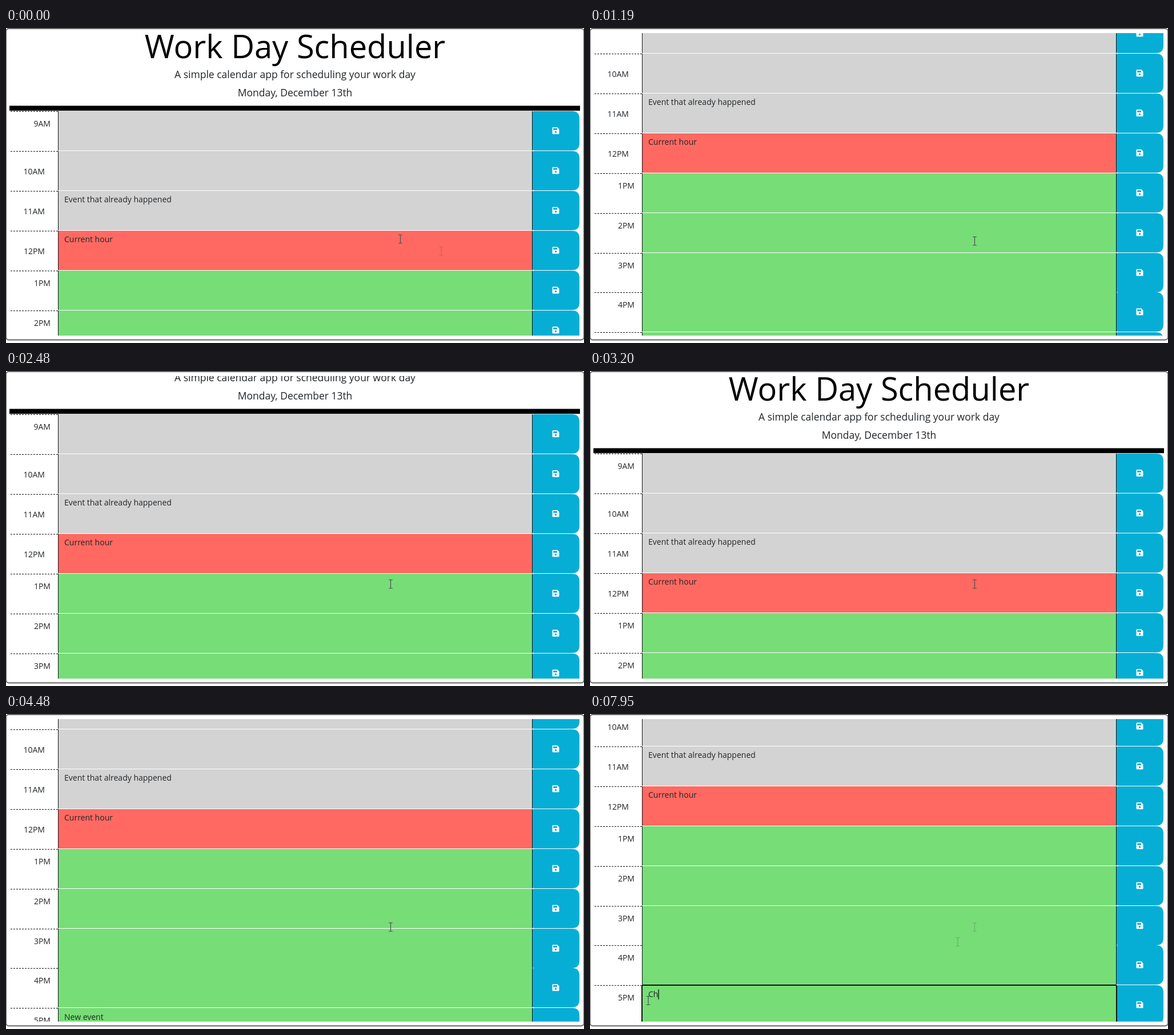
An HTML page for the animation above (8 s loop, 1012 px wide and 553 px high).

```html
<!DOCTYPE html>
<html lang="en">
<head>
<meta charset="utf-8">
<title>Work Day Scheduler</title>
<style>
  html, body { margin: 0; width: 100%; height: 100%; overflow: hidden; background: #fff; }
  svg { display: block; width: 1012px; height: 553px; font: 14px "Open Sans", "Noto Sans", sans-serif; }
  text { fill: #212529; }
  .title { font-size: 56px; fill: #000; text-anchor: middle; }
  .lead { font-size: 17.5px; text-anchor: middle; }
  .past { fill: #d3d3d3; }
  .present { fill: #ff6961; }
  .future { fill: #77dd77; }
  .beam { fill: none; stroke: #4c5352; stroke-width: 1.2; }
  .ghost { opacity: .3; }
</style>
</head>
<body>
<svg viewBox="0 0 1012 553">
  <defs>
    <clipPath id="view"><rect x="6" y="9" width="999" height="531"/></clipPath>
    <clipPath id="selClip"><rect id="selMask" y="480" width="0" height="24"/></clipPath>
    <path id="beam" d="M-3.5 -7.5H-1L0 -6.5L1 -7.5H3.5M0 -6.5V6.5M-3.5 7.5H-1L0 6.5L1 7.5H3.5"/>
    <path id="disk" fill="#fff" fill-rule="evenodd" d="M-4.8 -6H2.9L6 -2.9V4.8Q6 6 4.8 6H-4.8Q-6 6 -6 4.8V-4.8Q-6 -6 -4.8 -6ZM-4.3 -4.3V-1.2H2.3V-4.3ZM0 .4A1.7 1.7 0 1 0 0 3.8A1.7 1.7 0 1 0 0 .4Z"/>
  </defs>
  <g clip-path="url(#view)">
    <g id="page">
      <text class="title" x="506" y="53">Work Day Scheduler</text>
      <text class="lead" x="506" y="88">A simple calendar app for scheduling your work day</text>
      <text class="lead" x="506" y="120">Monday, December 13th</text>
      <rect x="6" y="136.5" width="999" height="8.7"/>
      <g id="rows"></g>
    </g>
    <g id="ghosts"></g>
    <rect id="focus" x="91" y="476" width="831" height="80" rx="2" fill="none" stroke="#111" stroke-width="2"/>
    <text id="entry" x="102" y="497">New event</text>
    <rect id="selBox" y="483" width="0" height="18" fill="#1c74d9"/>
    <text x="102" y="497" style="fill:#fff" clip-path="url(#selClip)">New event</text>
    <rect id="caret" y="483.5" width="1.2" height="17.5"/>
    <circle id="press" r="10.5" fill="#e0c81c" opacity=".82"/>
    <use id="mouse" href="#beam" class="beam"/>
  </g>
  <rect x="0" y="1" width="1012" height="546.5" rx="5" fill="none" stroke="#666" stroke-width="2"/>
</svg>
<script>
const LOOP = 8000;
const $ = id => document.getElementById(id);
const entry = $('entry');

// label, note
const hours = [
  ['9AM', ''], ['10AM', ''], ['11AM', 'Event that already happened'],
  ['12PM', 'Current hour'], ['1PM', ''], ['2PM', ''], ['3PM', ''], ['4PM', ''], ['5PM', '']
];

function rowMarkup([label, note], i) {
  const top = Math.round(146 + 69.92 * i);
  const kind = i < 3 ? 'past' : i === 3 ? 'present' : 'future';
  const wide = label.length > 3;
  return `<g transform="translate(0 ${top})">
    <path d="M8 .5H91" stroke="#000" stroke-dasharray="3 2"/>
    <text x="${wide ? 68 : 78}" y="${wide ? 41 : 27}" text-anchor="end">${label}</text>
    <rect class="${kind}" x="91" width="831" height="69"/>
    <path d="M91.5 0V69M921.5 0V69" stroke="#111"/>
    <text x="102" y="20">${note}</text>
    <path fill="#06aed5" d="M924 0H991Q1004 0 1004 13V56Q1004 69 991 69H924Q922 69 922 67V2Q922 0 924 0Z"/>
    <use href="#disk" x="962.5" y="34.3"/>
  </g>`;
}
$('rows').innerHTML = hours.map(rowMarkup).join('');

// scroll runs: first time, last time, steps, first offset, last offset
const scroll = [
  [0, 0, 1, 0, 0],
  [460, 840, 6, 5, 88],
  [980, 1190, 3, 105, 171],
  [1270, 1310, 2, 174, 175],
  [1450, 1650, 4, 185, 226],
  [1790, 1870, 2, 228, 229],
  [2270, 2340, 2, 190, 120],
  [2480, 2610, 3, 70, 0],
  [3200, 3200, 1, 1, 1],
  [3340, 4080, 10, 10, 130],
  [4150, 4150, 1, 144, 144],
  [4410, 4620, 4, 169, 229]
].flatMap(([t0, t1, n, a, b]) => Array.from({ length: n }, (_, k) => {
  const p = n > 1 ? k / (n - 1) : 0;
  return [Math.floor(t0 + (t1 - t0) * p), Math.round(a + (b - a) * p)];
}));

// time, x, y
const mouse = [
  [0, 690.5, 370.5], [70, 673.5, 374], [5170, 644, 400], [5240, 437, 518],
  [5380, 280, 519], [5460, 212, 508], [5530, 186, 498], [5600, 176, 494],
  [5680, 172, 492], [6490, 159, 492], [6560, 149, 492], [6630, 136, 493],
  [6890, 124, 496], [6980, 113, 499], [7070, 105, 502], [7160, 102, 503]
];

// time, first selected letter
const select = [[0, 9], [6490, 8], [6560, 7], [6630, 5], [6890, 3], [6980, 1], [7070, 0], [7820, 9]];
const typed = [[0, 'New event'], [7820, 'C'], [7950, 'Ch']];

// from, to, x, y
const ghosts = [[0, 460, 762, 392], [5170, LOOP, 673.5, 374], [5240, LOOP, 644, 400]];
$('ghosts').innerHTML = ghosts.map(([, , x, y]) =>
  `<use href="#beam" class="beam ghost" x="${x}" y="${y}"/>`).join('');

const at = (list, t) => list.findLast(item => item[0] <= t);
const show = (el, on) => el.setAttribute('visibility', on ? 'visible' : 'hidden');
const set = (el, attrs) => { for (const k in attrs) el.setAttribute(k, attrs[k]); };

function draw(t) {
  const offset = at(scroll, t)[1];
  $('page').setAttribute('transform', `translate(0 ${-offset})`);

  const [, x, y] = at(mouse, t);
  set($('mouse'), { x, y });
  set($('press'), { cx: x - 0.5, cy: y });
  show($('press'), t >= 5950 && t < 7300);
  show($('focus'), t >= 5950);
  [...$('ghosts').children].forEach((g, i) => show(g, t >= ghosts[i][0] && t < ghosts[i][1]));

  const word = at(typed, t)[1];
  if (entry.textContent !== word) entry.textContent = word;
  entry.setAttribute('y', 725 - offset + (t >= 0 ? 1 : 0));

  const end = 102 + entry.getComputedTextLength();
  const first = at(select, t)[1];
  const picked = first < word.length;
  const left = picked ? entry.getStartPositionOfChar(first).x : end;
  const span = { x: left, width: picked ? end - left + 0.5 : 0 };
  set($('selBox'), span);
  set($('selMask'), span);
  $('caret').setAttribute('x', end);
  show($('caret'), t >= 5950 && !picked);
}

const start = performance.now();
function tick() {
  draw((performance.now() - start) % LOOP);
  requestAnimationFrame(tick);
}
draw(0);
requestAnimationFrame(tick);
</script>
</body>
</html>
```
